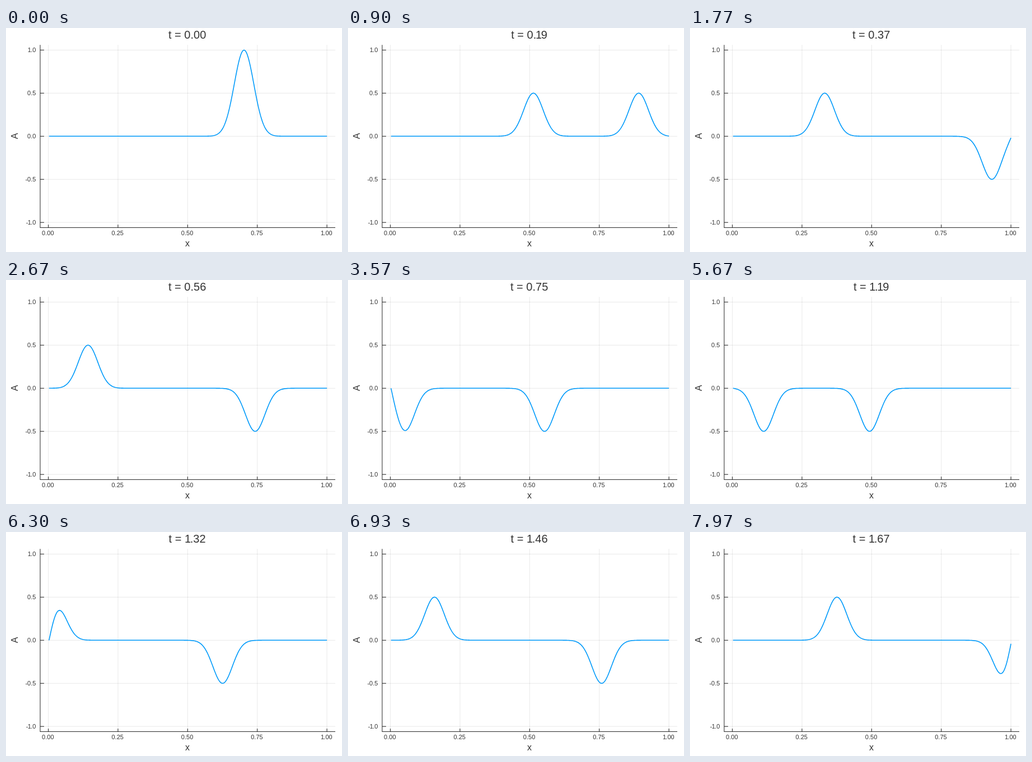
Animation, 600 px wide and 400 px high, one loop 8000 ms. Source, as an HTML page:

```html
<!DOCTYPE html>
<html lang="en">
<head>
<meta charset="utf-8">
<title>Wave on a string</title>
<style>
  html, body { margin: 0; width: 100%; height: 100%; overflow: hidden; background: #fff; }
  svg { display: block; width: 600px; height: 400px; }
  text { font-family: "Liberation Sans", Arial, sans-serif; fill: #333; }
  .tick { font-size: 11px; }
  .label { font-size: 16px; text-anchor: middle; }
  .title { font-size: 20px; text-anchor: middle; }
  .grid { stroke: #000; stroke-opacity: .1; stroke-width: .9; }
  .axis { stroke: #222; stroke-width: 1; }
  #wave { fill: none; stroke: #009afa; stroke-width: 1.6; stroke-linejoin: round; }
</style>
</head>
<body>
<svg id="plot" viewBox="0 0 600 400">
  <g id="frame"></g>
  <path id="wave"/>
  <text class="title" id="title" x="323.6" y="19"></text>
  <text class="label" x="324" y="390">x</text>
  <text class="label" transform="translate(21 193) rotate(-90)">A</text>
</svg>
<script>
const LOOP = 8000, DT = 0.007;
const START = 0.7, SIGMA = 0.035, CELL = 1 / 400;
const LEFT = 61, RIGHT = 588, TOP = 30.2, BOTTOM = 356.4;
const X = x => 75.6 + 497.5 * x;
const Y = y => 193.3 - 153.9 * y;

const byId = id => document.getElementById(id);
const frame = byId('frame'), wave = byId('wave'), title = byId('title');

function add(tag, attrs, text = '') {
  const el = document.createElementNS('http://www.w3.org/2000/svg', tag);
  for (const key in attrs) el.setAttribute(key, attrs[key]);
  frame.append(el);
  el.textContent = text;
  return el;
}
const line = (cls, x1, y1, x2, y2) => add('line', { class: cls, x1, y1, x2, y2 });

// Tighten the pairs around a "1"
function setText(el, text) {
  const dx = [...text].map((c, i) =>
    i && (c === '1' || text[i - 1] === '1') && c !== ' ' && text[i - 1] !== ' ' ? -0.065 : 0);
  el.textContent = text;
  el.setAttribute('dx', dx.map(d => d + 'em').join(' '));
}

function drawAxes() {
  for (let i = 0; i <= 4; i++) {
    const x = X(i / 4), v = 1 - i / 2, y = Y(v);
    line('grid', x, TOP, x, BOTTOM);
    line('grid', LEFT, y, RIGHT, y);
    line('axis', x, BOTTOM, x, BOTTOM - 5.3);
    line('axis', LEFT, y, LEFT + 7, y);
    setText(add('text', { class: 'tick', x: x - 0.8, y: 370, 'text-anchor': 'middle' }), (i / 4).toFixed(2));
    setText(add('text', { class: 'tick', x: 53.4, y: y + 4, 'text-anchor': 'end' }), v.toFixed(1));
  }
  line('axis', LEFT, TOP, LEFT, BOTTOM + 0.5);
  line('axis', LEFT, BOTTOM, RIGHT, BOTTOM);
}

const pulse = x => Math.exp(-((x - START) ** 2) / (2 * SIGMA ** 2));

// Odd extension with period 2 keeps both ends fixed
function extended(x) {
  const s = ((x % 2) + 2) % 2;
  return s <= 1 ? pulse(s) : -pulse(2 - s);
}
const height = (x, t) => (extended(x - t) + extended(x + t)) / 2;

function draw(ms) {
  const tick = Math.floor(ms / 10) * 10;
  const t = DT * Math.floor(tick * 0.03 + 0.11);
  let d = '';
  for (let i = 0; i < 400; i++) {
    const x = i * CELL;
    d += (i ? 'L' : 'M') + X(x + CELL).toFixed(2) + ' ' + Y(height(x, t)).toFixed(2);
  }
  wave.setAttribute('d', d);
  setText(title, 't = ' + t.toFixed(2));
}

drawAxes();
draw(0);
const begin = performance.now();
function loop() {
  draw((performance.now() - begin) % LOOP);
  requestAnimationFrame(loop);
}
requestAnimationFrame(loop);
</script>
</body>
</html>
```
